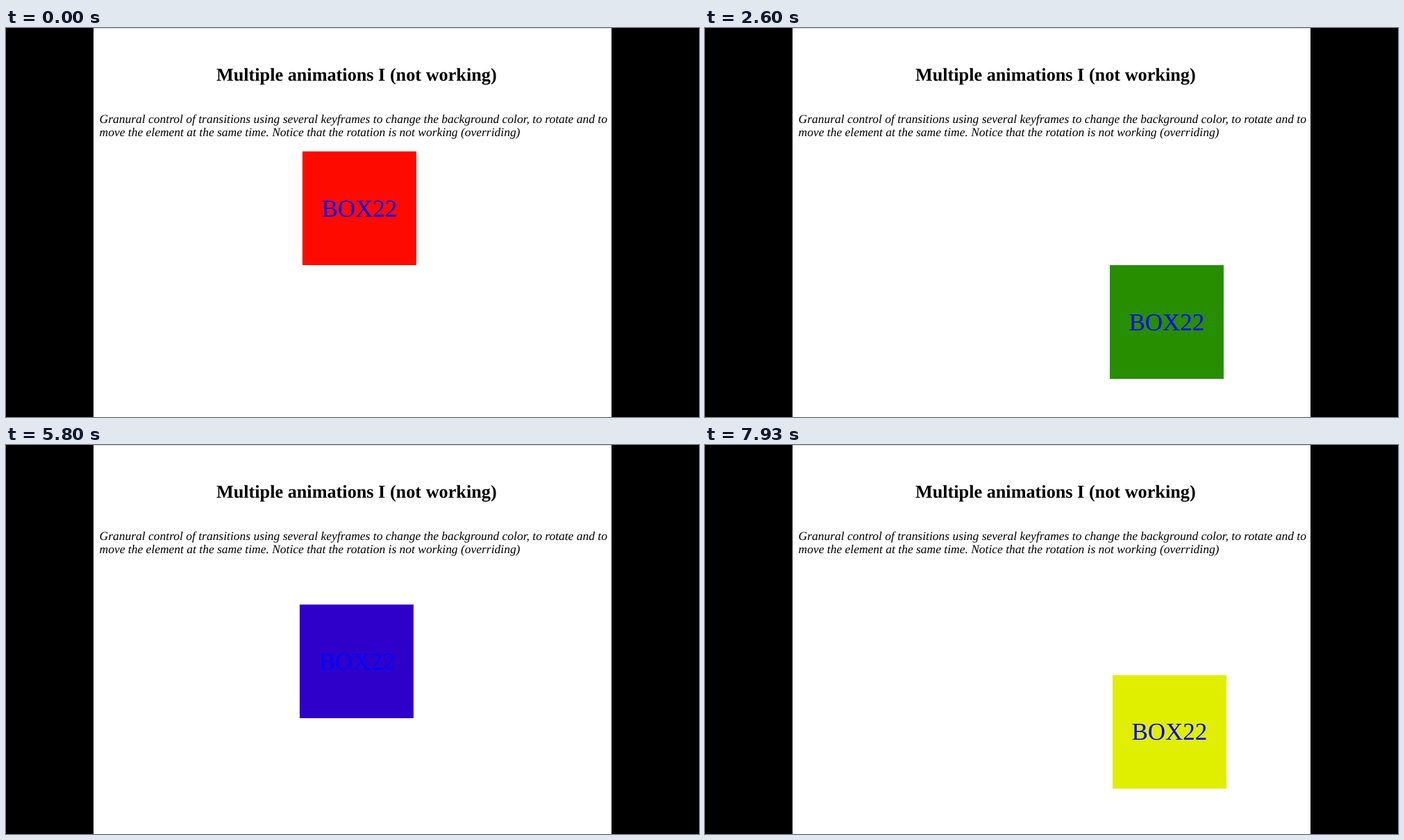
An HTML page for the animation above (8 s loop, 998 by 561 pixels).

```html
<!DOCTYPE html>
<html lang="en">
<head>
<meta charset="utf-8">
<title>Multiple animations</title>
<style>
  html, body { margin: 0; width: 100%; height: 100%; overflow: hidden; background: #000; }
  svg { display: block; width: 100%; height: 100%; }
  text { font-family: "Liberation Serif", "Times New Roman", serif; text-rendering: geometricPrecision; }
  h2, .title { font-size: 26.24px; font-weight: bold; text-anchor: middle; }
  .intro { font-size: 17.49px; font-style: italic; }
  .label { font-size: 34.98px; text-anchor: middle; fill: #00f; }
</style>
</head>
<body>
<svg viewBox="0 0 998 561">
  <rect width="998" height="561" fill="#000"/>
  <rect x="126" width="746" height="561" fill="#fff"/>
  <path d="M126 .5H872M126.25 0V561" stroke="#aaa" stroke-width=".5"/>
  <text class="title" x="504.8" y="75.5">Multiple animations I (not working)</text>
  <text class="intro" x="134.6" y="136.5">Granural control of transitions using several keyframes to change the background color, to rotate and to</text>
  <text class="intro" x="134.6" y="156.2">move the element at the same time. Notice that the rotation is not working (overriding)</text>
  <g id="box">
    <rect id="face" x="422.9" y="178" width="164" height="164"/>
    <text class="label" x="504.9" y="271.5">BOX22</text>
  </g>
</svg>
<script>
  const LOOP = 8000, PASS = 5000, TURN = 50, FRAME = 1000 / 15, SIDE = 164;

  const corners = [[0, 0], [1, 0], [1, 1], [0, 1], [0, 0]];
  const colors = ['#ff0500', '#ffa012', '#ffff00', '#007a00', '#0000ff', '#74007d'];

  // Evenly spaced keyframes, each step eased on its own.
  const play = (id, steps) => {
    const animation = document.getElementById(id).animate(
      steps.map(step => ({ ...step, easing: 'ease' })),
      { duration: PASS, fill: 'both' });
    animation.pause();
    return animation;
  };

  const animations = [
    play('box', corners.map(([x, y]) => ({ transform: `translate(${x * SIDE}px, ${y * SIDE}px)` }))),
    play('face', colors.map(fill => ({ fill })))
  ];

  // The pass alternates: it ends a reverse run at TURN, then goes forward and back again.
  function draw(time) {
    const shown = Math.floor((time % LOOP + 4) / FRAME) * FRAME % LOOP;
    const elapsed = Math.abs(shown - TURN);
    const position = elapsed > PASS ? 2 * PASS - elapsed : elapsed;
    for (const animation of animations) animation.currentTime = position;
  }

  const start = performance.now();
  function tick() {
    draw(performance.now() - start);
    requestAnimationFrame(tick);
  }
  tick();
</script>
</body>
</html>
```
